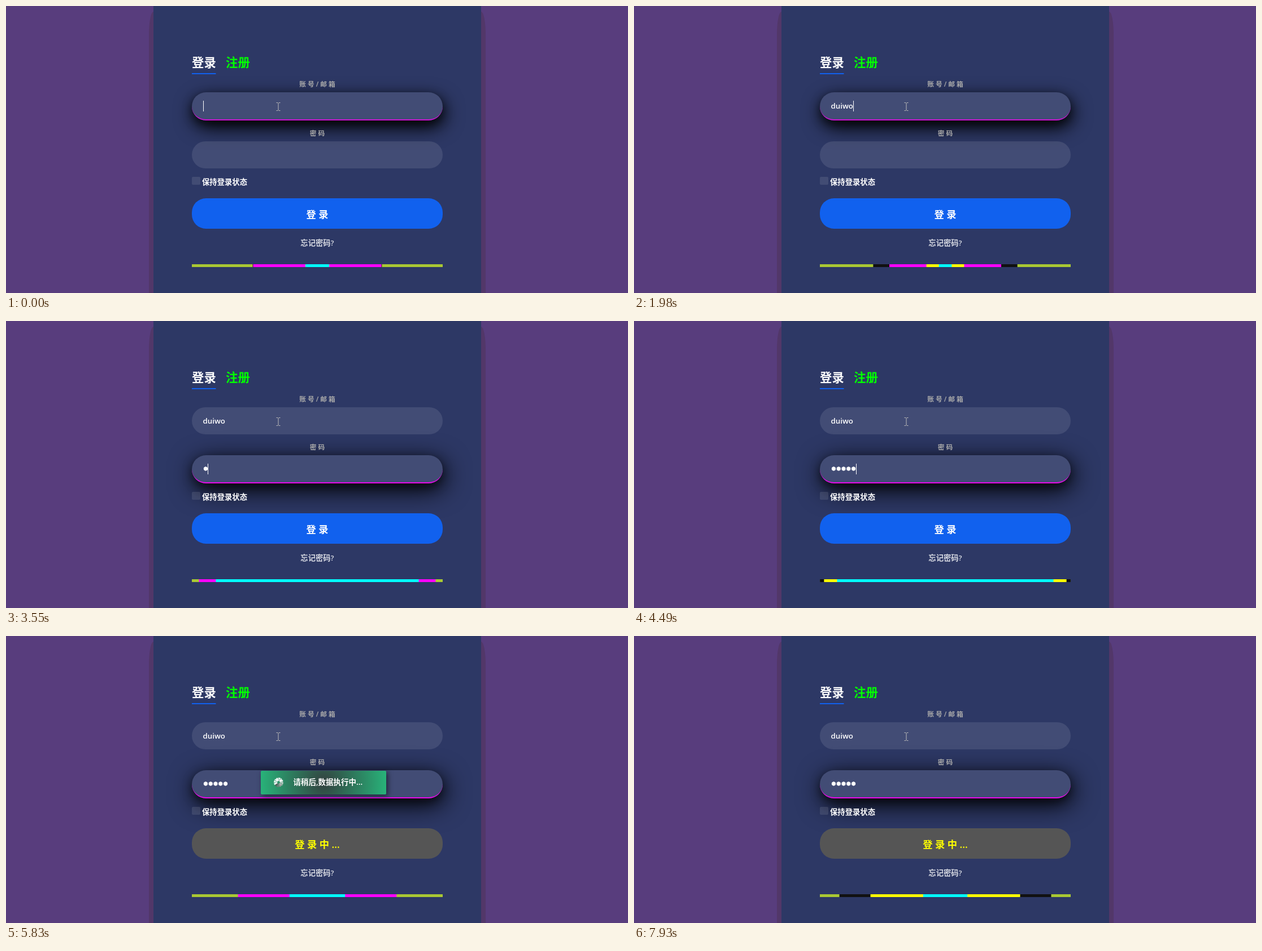
An HTML page for the animation above (8 s loop, 1101x509 px).

```html
<!DOCTYPE html>
<html lang="zh-CN">
<head>
<meta charset="utf-8">
<title>登录</title>
<style>
  html, body { margin: 0; width: 100%; height: 100%; overflow: hidden; }
  body {
    --t: 0ms;
    position: relative; background: #583d7d; color: #fff;
    font: 600 13.33px "Open Sans", "Noto Sans CJK SC", "Noto Sans CJK", sans-serif;
  }
  div, i, svg { position: absolute; box-sizing: border-box; }
  [hidden] { display: none !important; }

  .glow { left: 253px; top: 10px; width: 596px; height: 520px; background: #523769; border-radius: 8px 8px 0 0 / 40px 40px 0 0; }
  .panel { left: 261px; top: 0; width: 580px; height: 509px; background: #2d3865; }

  .field {
    left: 329px; width: 444px; height: 48px; padding-left: 19.5px;
    display: flex; align-items: center; white-space: pre;
    border-radius: 25px; background: rgba(255, 255, 255, .1);
  }
  .field.on { height: 50px; border-bottom: 2px solid; }
  #account { top: 153px; }
  #account.on { border-color: #cc12d2; box-shadow: 3px 12px 34px #000, 0 6px 16px rgba(0, 0, 0, .5); }
  #secret { top: 240px; }
  #secret.on { top: 238px; border-color: #e808e8; box-shadow: 4px 11px 46px #000, 0 6px 16px rgba(0, 0, 0, .5); }
  .caret { position: static; width: 1px; height: 19px; background: #fff; }
  #dots { height: 8px; background: radial-gradient(circle at 4.4px 50%, #fff 3.3px, transparent 4px) 0 0 / 8.8px 8px; }

  .check { left: 329px; top: 302.5px; width: 14.5px; height: 14.5px; border-radius: 2px; background: rgba(255, 255, 255, .1); }
  .button { left: 329px; top: 341px; width: 444px; height: 54px; border-radius: 25px; background: #1161ee; }
  .busy .button { background: #555; }

  .bar { left: 329px; top: 458px; width: 444px; height: 5px; background: #a9c833; }
  .bar i {
    inset: 0; background: var(--c);
    animation: grow 961.8ms ease infinite alternate paused;
    animation-delay: calc(-1828ms - var(--lead) - var(--t));
  }
  @keyframes grow { from { transform: scaleX(0); } }

  svg { left: 0; top: 0; }
  text { fill: #fff; }
  .mid { text-anchor: middle; }
  .tab { font-size: 21.4px; }
  .label { font-size: 11.7px; fill: #aaa; }
  .action { font-size: 17.3px; }
  .busy .action { fill: #ff0; }

  #toast {
    left: 450.5px; top: 238.5px; width: 222px; height: 42.5px; overflow: hidden;
    border-radius: 2px; background: radial-gradient(circle, #33403f, #28b47a);
    box-shadow: 3px 3px 10px rgba(0, 0, 0, .5);
    animation: tada 960ms ease calc(4732ms - var(--t)) paused,
      fold 385ms var(--swing) calc(6558ms - var(--t)) forwards paused;
    --swing: cubic-bezier(.37, 0, .63, 1);
  }
  .message { left: 0; top: 0; width: 222px; height: 42px; animation: lift 385ms var(--swing) calc(6558ms - var(--t)) forwards paused; }
  .message span { position: absolute; left: 57.5px; top: 10px; font-size: 13.5px; line-height: 20px; white-space: nowrap; }
  .spinner {
    left: 23px; top: 12.5px; width: 17px; height: 17px; border-radius: 50%;
    background: conic-gradient(#fff 50%, #444);
    mask: radial-gradient(circle, transparent 2px, #000 2.6px), repeating-conic-gradient(#000 0 21deg, transparent 22deg 29deg, #000 30deg);
    mask-composite: intersect;
    animation: spin 1s steps(12) calc(0ms - var(--t)) infinite paused;
  }
  @keyframes tada {
    10%, 20% { transform: scale(.9) rotate(-3deg); }
    30%, 50%, 70%, 90% { transform: scale(1.1) rotate(3deg); }
    40%, 60%, 80% { transform: scale(1.1) rotate(-3deg); }
  }
  @keyframes fold { to { height: 0; } }
  @keyframes lift { to { transform: translateY(-10.5px); } }
  @keyframes spin { to { transform: rotate(360deg); } }
</style>
</head>
<body>
<div class="glow"></div>
<div class="panel"></div>

<div class="field" id="account"><span id="user"></span><i class="caret"></i></div>
<div class="field" id="secret"><span id="dots"></span><i class="caret"></i></div>
<div class="check"></div>
<div class="button"></div>
<div class="bar">
  <i style="--c:#111;--lead:385ms"></i>
  <i style="--c:#f0f;--lead:-192ms"></i>
  <i style="--c:#ff0;--lead:192ms"></i>
  <i style="--c:#0ff;--lead:0ms"></i>
</div>

<svg width="1101" height="509">
  <text class="tab" x="329" y="108">登录</text>
  <text class="tab" x="389" y="108" style="fill:#0f0">注册</text>
  <rect x="329" y="119" width="42.5" height="2" fill="#1161ee"/>
  <text class="label mid" x="551" y="143">账 号 / 邮 箱</text>
  <text class="label mid" x="551" y="230" id="secretLabel">密 码</text>
  <text x="347" y="317">保持登录状态</text>
  <text class="action mid" x="551" y="375.5" id="action"></text>
  <text class="mid" x="551" y="424.5" style="fill:#d6d9e2">忘记密码?</text>
  <path d="M478.5 171.5h2.5l1 1 1-1h2.5M482 172.5v12M478.5 185.5h2.5l1-1 1 1h2.5" fill="none" stroke="#bbb"/>
</svg>

<div id="toast" hidden>
  <div class="message"><i class="spinner"></i><span>请稍后,数据执行中...</span></div>
</div>

<script>
  const LOOP = 8000, FOCUS = 2150, SUBMIT = 4732, CLOSED = 6943;
  const BLINK = 1020, DOT = 8.8;
  const NAME = 'duiwo';
  const nameKeys = [500, 760, 1010, 1290, 1560];
  const secretKeys = [3320, 3520, 3720, 3900, 4102];

  // The picture advances in uneven ticks: first, last, count
  const ticks = [
    [0, 0, 1], [120, 1140, 9], [1290, 2220, 8], [2340, 2910, 5], [3190, 4120, 8],
    [4240, 4490, 3], [4630, 5020, 4], [5170, 5170, 1], [5290, 6260, 8],
    [6420, 6720, 3], [6850, 7390, 5], [7510, 7930, 4]
  ].flatMap(([a, b, n]) => Array.from({ length: n }, (_, i) => a + (b - a) * i / Math.max(1, n - 1)));

  const $ = id => document.getElementById(id);
  const [nameCaret, secretCaret] = document.querySelectorAll('.caret');
  const typed = (keys, t) => keys.filter(k => t >= k).length;
  const caretOn = (keys, since, t) => {
    const last = Math.max(since, ...keys.filter(k => t >= k));
    return (t - last) % BLINK < BLINK / 2;
  };

  function draw(t) {
    const onSecret = t >= FOCUS, busy = t >= SUBMIT;
    document.body.style.setProperty('--t', t + 'ms');
    document.body.classList.toggle('busy', busy);

    $('account').classList.toggle('on', !onSecret);
    $('secret').classList.toggle('on', onSecret);
    $('secretLabel').setAttribute('y', onSecret ? 228 : 230);

    $('user').textContent = NAME.slice(0, typed(nameKeys, t));
    $('dots').style.width = typed(secretKeys, t) * DOT + 'px';
    nameCaret.hidden = onSecret || !caretOn(nameKeys, 0, t);
    secretCaret.hidden = !onSecret || !caretOn(secretKeys, FOCUS, t);

    $('action').textContent = busy ? '登 录 中 ...' : '登 录';
    $('toast').hidden = !busy || t >= CLOSED;
  }

  const start = performance.now();
  function frame() {
    const now = (performance.now() - start) % LOOP;
    draw(ticks.findLast(k => k <= now));
    requestAnimationFrame(frame);
  }
  frame();
</script>
</body>
</html>
```
